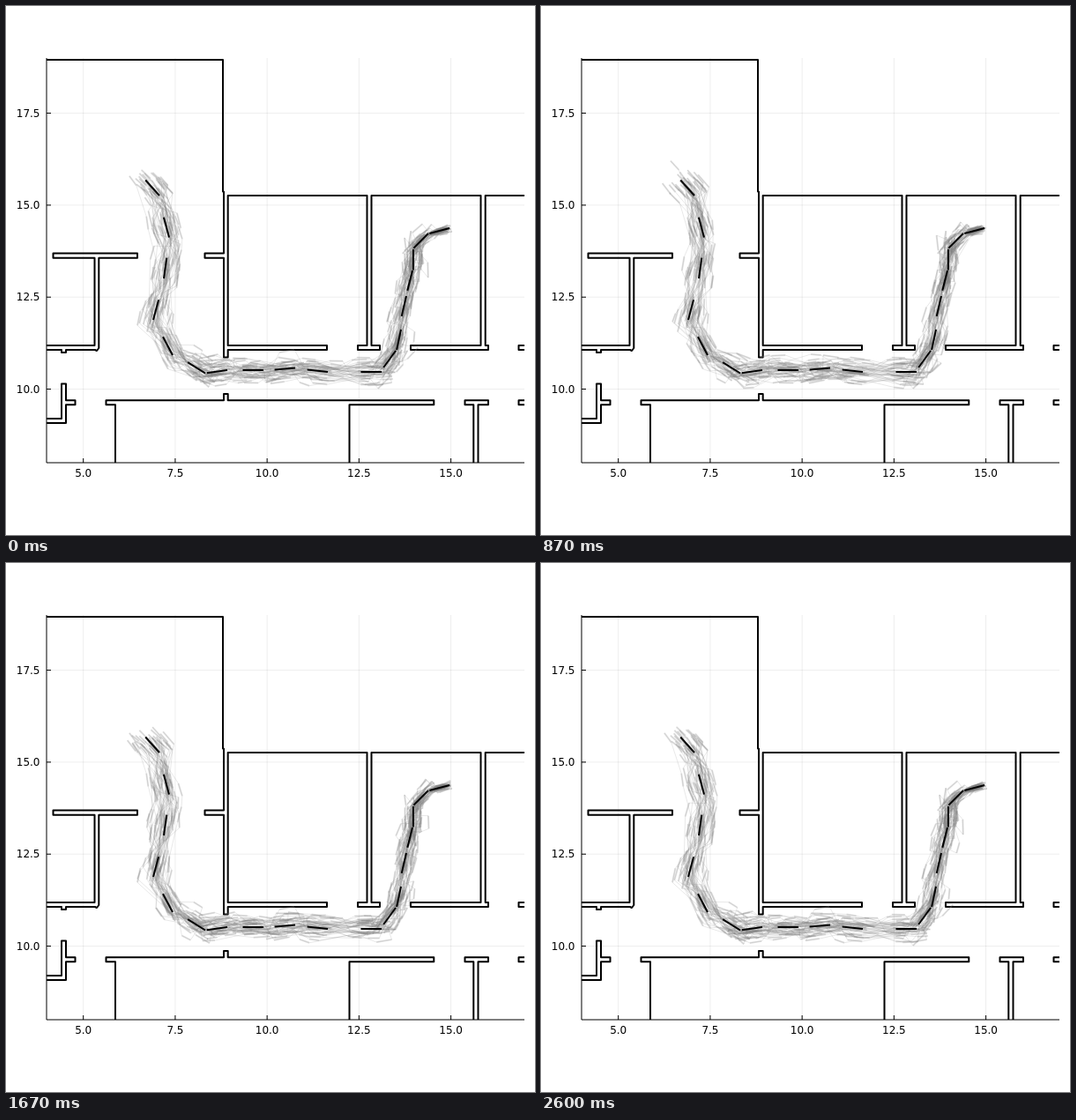
Animation, 600 px wide and 600 px high, one loop 2670 ms. Source, as an HTML page with a canvas:

```html
<!DOCTYPE html>
<html lang="en">
<head>
<meta charset="utf-8">
<title>Path samples</title>
<style>
  html, body { margin: 0; width: 100%; height: 100%; overflow: hidden; background: #fff; }
  svg, canvas { position: absolute; left: 0; top: 0; width: 600px; height: 600px; }
  text { font: 12px "DejaVu Sans", sans-serif; }
  path { fill: none; stroke: #000; }
</style>
</head>
<body>
<svg viewBox="0 0 600 600">
  <path id="grid" stroke-opacity=".07"/>
  <path id="axes"/>
  <g id="labels"></g>
  <path stroke-width="2" stroke-linejoin="round" d="
    M46 61H246V210.5H247V280.5H225.5V285.7H247V398.5H251.7V390H364V385H251.7V215H409.5V385H399V390H424V385H414.5V215H538.5V385H459V390H547V385H543.7V215H588
    M46 385H100.5V285.7H53.5V280.5H149V285.7H105.3V388L103 391L101 390H68V393H63V390H46
    M46 468H63V428.5H68V447.3H78.5V452.3H68V473H46
    M124 518V452.3H113.5V447.3H247V440H251.7V447.3H485.3V452.3H389.5V518
    M530.3 518V452.3H520.5V447.3H547V452.3H535.5V518
    M588 385H581.5V390H588M588 447.3H581.5V452.3H588"/>
</svg>
<canvas id="view" width="600" height="600"></canvas>
<script>
const LOOP = 2670, STEPS = 40, COUNT = 40, CHUNK = 6, LENGTH = 23.5;

// Start of each stride: x, y, heading in degrees
const strides = [
  [503, 252, 165], [479, 258, 135], [462, 276, 90], [461, 300, 104], [454, 329, 103], [448, 367, 102],
  [442, 391, 126], [426, 415, 180], [365, 415, 186], [328, 410.5, 175], [292, 413, 180], [251, 413, 172],
  [226, 416.5, 212], [189, 396, 242], [167, 356, -75], [179, 309, -82], [185, 262.5, -105], [174, 215, -132]
].map(([x, y, deg]) => {
  const angle = deg * Math.PI / 180;
  return { x: x + Math.cos(angle) * LENGTH / 2, y: y + Math.sin(angle) * LENGTH / 2, angle };
});

function random(seed) {
  let a = Math.imul(seed + 1, 0x9E3779B1);
  return () => {
    a = (a + 0x6D2B79F5) | 0;
    let t = Math.imul(a ^ (a >>> 15), 1 | a);
    t = (t + Math.imul(t ^ (t >>> 7), 61 | t)) ^ t;
    return ((t ^ (t >>> 14)) >>> 0) / 4294967296;
  };
}

function segment(x, y, angle, length) {
  const dx = Math.cos(angle) * length / 2, dy = Math.sin(angle) * length / 2;
  return [x - dx, y - dy, x + dx, y + dy];
}

// The walk starts at a known point and grows less certain along the way.
function scatter({ x, y, angle }, k, rnd) {
  const spread = () => rnd() + rnd() + rnd() - 1.5;
  const doubt = Math.min(1, 0.3 + k * 0.5);
  const side = doubt * (12.5 + k * 0.25) * spread();
  const along = doubt * 21 * spread();
  const dx = Math.cos(angle), dy = Math.sin(angle);
  return segment(x + dx * along - dy * side, y + dy * along + dx * side,
    angle + 0.2 * spread(), 10 + 9 * rnd());
}

// Each stretch of a sample alternates between two draws at its own moments.
const samples = Array.from({ length: COUNT }, (_, i) => {
  const rnd = random(i * 17 + 5);
  const draws = [0, 1].map(() => strides.map((s, k) => scatter(s, k, rnd)));
  const timing = [0, 1, 2].map(() => [Math.floor(rnd() * STEPS), 12 + Math.floor(rnd() * 16)]);
  return { draws, timing };
});

function poseAt({ draws, timing }, step) {
  return strides.map((_, k) => {
    const [start, span] = timing[Math.floor(k / CHUNK)];
    const version = (step - start + STEPS) % STEPS < span ? 0 : 1;
    return draws[version][k];
  });
}

const ctx = document.getElementById("view").getContext("2d");

function pen(color, width) {
  ctx.strokeStyle = color;
  ctx.lineWidth = width;
}

function dash([x1, y1, x2, y2]) {
  ctx.beginPath();
  ctx.moveTo(x1, y1);
  ctx.lineTo(x2, y2);
  ctx.stroke();
}

function draw(step) {
  ctx.clearRect(0, 0, 600, 600);
  for (const sample of samples) {
    const pose = poseAt(sample, step);
    pen("rgba(128,128,128,.18)", 1);
    ctx.beginPath();
    ctx.moveTo(503, 252);
    for (const [x1, y1, x2, y2] of pose) {
      ctx.lineTo(x1, y1);
      ctx.lineTo(x2, y2);
    }
    ctx.stroke();
    pen("rgba(128,128,128,.23)", 2);
    pose.forEach(dash);
  }
  pen("#000", 2);
  for (const { x, y, angle } of strides) dash(segment(x, y, angle, LENGTH));
}

function buildAxes() {
  let grid = "", axes = "M46 59V518H588", labels = "";
  const label = (x, y, anchor, v) => {
    labels += `<text x="${x}" y="${y}" text-anchor="${anchor}">${v.toFixed(1)}</text>`;
  };
  for (let v = 5; v <= 15; v += 2.5) {
    const x = 46 + (v - 4) * 542 / 13;
    grid += `M${x} 59V518`;
    axes += `M${x} 518v-5`;
    label(x, 533.5, "middle", v);
  }
  for (let v = 10; v <= 17.5; v += 2.5) {
    const y = 518 - (v - 8) * 41.73;
    grid += `M46 ${y}H588`;
    axes += `M46 ${y}h5`;
    label(38.5, Math.round(y + 4.2), "end", v);
  }
  document.getElementById("grid").setAttribute("d", grid);
  document.getElementById("axes").setAttribute("d", axes);
  document.getElementById("labels").innerHTML = labels;
}

let shown = -1;
const begin = performance.now();

function tick() {
  const t = (performance.now() - begin) % LOOP;
  const step = Math.min(STEPS - 1, Math.floor((t + 5) * 3 / 200));
  if (step !== shown) draw(shown = step);
  requestAnimationFrame(tick);
}

buildAxes();
tick();
</script>
</body>
</html>
```
